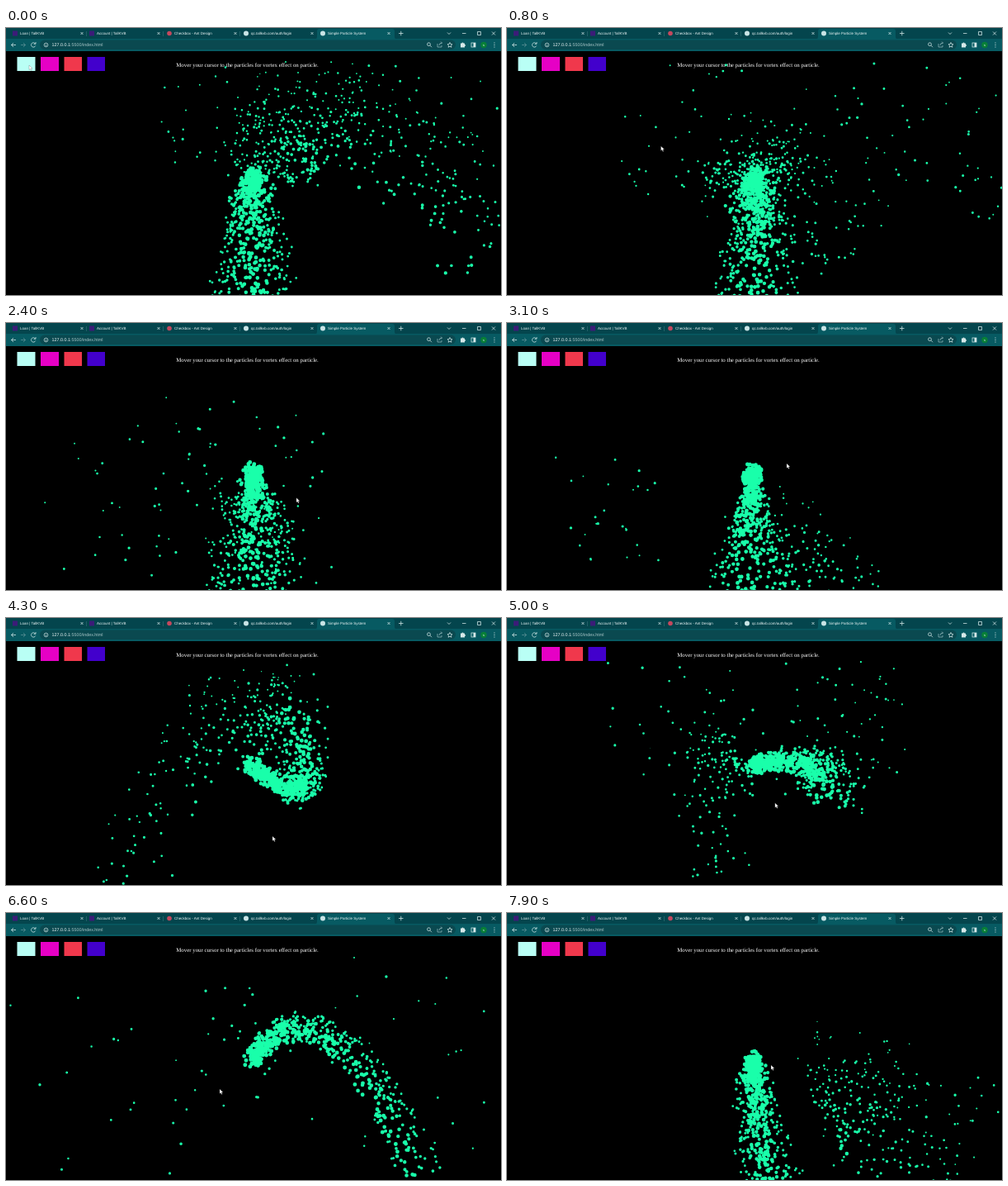
Recreate the animation shown at these times as an HTML page with a canvas. Size 600 px wide and 323 px high, loop 8 s.

```html
<!DOCTYPE html>
<html lang="en">
<head>
<meta charset="utf-8">
<title>Simple Particle System</title>
<style>
  html, body { margin: 0; width: 100%; height: 100%; overflow: hidden; background: #000; }
  canvas, svg { position: absolute; left: 0; top: 0; width: 600px; height: 323px; }
  text { text-rendering: geometricPrecision; }
  .ui { font: 4.5px "Liberation Sans", Arial, sans-serif; fill: #f0f8f8; }
  .line { fill: none; stroke: #d5e8e8; stroke-width: .75; }
</style>
</head>
<body>
<canvas id="stage" width="600" height="323"></canvas>
<svg viewBox="0 0 600 323">
  <rect width="600" height="14" fill="#04454d"/>
  <rect y="13" width="600" height="15" fill="#075a62"/>
  <path d="M374 13.5q3 0 3-3V4q0-3 3-3h88q3 0 3 3v6.500q0 3 3 3z" fill="#075a62"/>
  <rect x="41" y="14.500" width="504" height="11.500" rx="5.700" fill="#0a4950"/>
  <g class="ui">
    <rect x="8" y="3.500" width="6" height="6" fill="#3c1c78"/>
    <rect x="101" y="3.500" width="6" height="6" fill="#3c1c78"/>
    <circle cx="198" cy="6.500" r="2.800" fill="#c4485e"/>
    <circle cx="291" cy="6.500" r="3" fill="#c9e4e6"/>
    <circle cx="384" cy="6.500" r="3" fill="#c9e4e6"/>
    <text x="17" y="8.200">Loan | TallKVB</text>
    <text x="110" y="8.200">Account | TallKVB</text>
    <text x="204" y="8.200">Checkbox - Ant Design</text>
    <text x="297" y="8.200">qc.tallkvb.com/auth/login</text>
    <text x="390" y="8.200">Simple Particle System</text>
    <text x="55.500" y="22.300" style="font-size:5.4px">127.0.0.1<tspan fill="#a9c6c8">:5500/index.html</tspan></text>
  </g>
  <g class="line">
    <path id="closers"/>
    <path d="M97.500 4v6M190.500 4v6M283.500 4v6" stroke="#2b6a70"/>
    <path d="M476 6.500h5.500M478.750 3.750v5.500M535 5.500l2 2 2-2M553 6.500h4.500M571.500 4.500h4v4h-4zM589 4.500l4 4m0-4l-4 4"/>
    <path d="M12 20.500H6.500m2.500-2.500l-2.500 2.500 2.500 2.500"/>
    <path d="M18 20.500h5.500m-2.500-2.500l2.500 2.500-2.500 2.500" stroke="#5f9297"/>
    <path d="M35.500 19a2.700 2.700 0 1 0 .2 2.500M36 17v2.300h-2.300"/>
    <circle cx="48.500" cy="20.500" r="2.300"/><path d="M48.500 20v1.700"/>
    <circle cx="512.500" cy="19.700" r="1.900"/><path d="M514 21.200l2 2"/>
    <path d="M523 19v4h5v-2M525 21q0-3 3.500-3m-1.500-1.500l1.500 1.500-1.500 1.500" stroke="#8fb5b8"/>
    <path d="M538 17.500l.9 2 2.100.2-1.600 1.500.5 2.100-1.900-1.100-1.900 1.100.5-2.100-1.600-1.500 2.100-.2z"/>
    <rect x="564" y="18" width="5" height="5"/>
  </g>
  <path d="M551 18.500h1.500a1 1 0 0 1 2 0h1.500v1.500a1 1 0 0 1 0 2v1.500h-5z" fill="#d5e8e8"/>
  <path d="M566.500 18h2.500v5h-2.500z" fill="#d5e8e8"/>
  <circle cx="579" cy="20.500" r="3.700" fill="#087f37"/>
  <text class="ui" x="579" y="22" text-anchor="middle" style="font-size:4px">s</text>
  <path d="M591.500 17.500h1v1h-1zm0 2.500h1v1h-1zm0 2.500h1v1h-1z" fill="#d5e8e8"/>
  <g>
    <rect x="13.500" y="35" width="22" height="17" fill="#b9fff5"/>
    <rect x="42" y="35" width="22" height="17" fill="#e600c5"/>
    <rect x="70.500" y="35" width="21.500" height="17" fill="#f0384c"/>
    <rect x="98.500" y="35" width="21.500" height="17" fill="#4200cc"/>
  </g>
  <text x="292.500" y="46.500" text-anchor="middle" fill="#fff"
    style="font:6.880px 'Liberation Serif','Times New Roman',serif">Mover your cursor to the particles for vortex effect on particle.</text>
  <path id="cursor" d="M0 0v5.600l1.300-1.200 1 2.100 1-.5-1-2 1.800-.1z" fill="#fff" stroke="#333" stroke-width=".25"/>
</svg>
<script>
const ctx = document.getElementById('stage').getContext('2d');
const cursor = document.getElementById('cursor');
document.getElementById('closers').setAttribute('d',
  [92, 185, 278, 371, 464].map(x => `M${x - 1.5} 5l3 3m0-3l-3 3`).join(''));

const LOOP = 8000, STEP = 100, EMITTER = [299, 178], STREAM = 570;

// jet: control x,y, end x,y, spread on either side, spread exponent
// cloud: start, control, end, spread, count; dust: x0,y0,x1,y1,count
const keys = [
  { t: 0, mouse: [28, 45], jet: [300, 250, 300, 345, 52, 52, .5],
    cloud: [303, 175, 345, 5, 610, 250, 66, 480], dust: [170, 32, 600, 200, 90] },
  { t: 1700, mouse: [365, 253], jet: [320, 230, 300, 345, 50, 62, .7],
    cloud: [285, 195, 190, 195, 175, 345, 75, 200], dust: [60, 40, 600, 315, 160] },
  { t: 3100, mouse: [339, 170], jet: [285, 240, 283, 345, 115, 50, 1.4],
    cloud: [310, 240, 390, 260, 430, 330, 45, 90], dust: [30, 130, 190, 323, 26] },
  { t: 4300, mouse: [323, 264], jet: [400, 270, 345, 105, 42, 36, 1],
    cloud: [330, 115, 230, 85, 140, 325, 50, 190], dust: [215, 50, 385, 130, 40] },
  { t: 5800, mouse: [327, 178], jet: [385, 46, 415, 340, 75, 14, 1.4],
    cloud: [205, 195, 230, 270, 390, 290, 40, 70], dust: [0, 40, 600, 323, 180] },
  { t: 6600, mouse: [259, 213], jet: [390, 70, 498, 340, 42, 7, .5],
    cloud: [285, 95, 270, 170, 180, 310, 25, 14], dust: [0, 45, 590, 320, 50] },
  { t: 7900, mouse: [320, 184], jet: [298, 240, 322, 345, 36, 36, .6],
    cloud: [375, 215, 470, 180, 505, 340, 72, 210], dust: [340, 185, 600, 320, 50] }
];

const rand = (i, k) => {
  const s = Math.sin(i * 127.1 + k * 311.7) * 43758.5453;
  return s - Math.floor(s);
};

function pose(t) {
  let k = 0;
  while (k < keys.length - 2 && keys[k + 1].t <= t) k++;
  const a = keys[k], b = keys[k + 1];
  const f = Math.min(1, (t - a.t) / (b.t - a.t));
  const mix = name => a[name].map((v, i) => v + (b[name][i] - v) * f);
  return { mouse: mix('mouse'), jet: mix('jet'), cloud: mix('cloud'), dust: mix('dust') };
}

// Point on a quadratic curve, pushed sideways by off
function along([x0, y0, x1, y1, x2, y2], u, off) {
  const v = 1 - u;
  const dx = v * (x1 - x0) + u * (x2 - x1), dy = v * (y1 - y0) + u * (y2 - y1);
  const len = Math.hypot(dx, dy) || 1;
  return [
    v * v * x0 + 2 * u * v * x1 + u * u * x2 + off * dy / len,
    v * v * y0 + 2 * u * v * y1 + u * u * y2 - off * dx / len
  ];
}

// Random shift inside a soft disc
function blur([x, y], seed, size) {
  const a = rand(seed, 5) * 2 * Math.PI, d = rand(seed, 6) * size;
  return [x + d * Math.cos(a), y + d * Math.sin(a)];
}

// Age 0..1 within the current life and a seed that changes with each life
function life(i, t, span) {
  const n = t / span + rand(i, 1), cycle = Math.floor(n);
  return [n - cycle, i + cycle * 0.377];
}

function dot([x, y], r) {
  if (r <= 0) return;
  ctx.moveTo(x + r, y);
  ctx.arc(x, y, r, 0, 7);
}

function draw(t) {
  const { mouse, jet, cloud, dust } = pose(t);
  ctx.clearRect(0, 0, 600, 323);
  ctx.fillStyle = '#19ffaa';
  ctx.beginPath();

  const curve = [...EMITTER, ...jet.slice(0, 4)];
  const [right, left, q] = jet.slice(4);
  for (let i = 0; i < STREAM; i++) {
    const [age, s] = life(i, t, 2000);
    const u = age ** 1.5, m = rand(s, 2) ** 1.15;
    const side = rand(s, 3) * (right + left) < right ? right : -left;
    const p = along(curve, u, side * m * u ** q);
    dot(blur(p, s, 12), 2.45 - 1.1 * m * Math.min(1, u * 3));
  }

  const spread = cloud[6], total = cloud[7];
  for (let i = 0; i < total; i++) {
    const [age, s] = life(i + 1000, t, 2400);
    const u = age ** 1.5, m = 1.2 * (rand(s, 2) + rand(s, 3) - 1);
    const p = along(cloud, u, m * spread);
    // lower particles are larger
    const drop = (p[1] - along(cloud, u, 0)[1]) / spread;
    dot(blur(p, s, 14), (1.2 + .6 * drop + .5 * rand(s, 4)) * Math.min(1, total - i));
  }

  const [x0, y0, x1, y1, count] = dust;
  for (let i = 0; i < count; i++) {
    const [age, s] = life(i + 2000, t, 1800);
    const x = x0 + (x1 - x0) * rand(s, 2) ** .7;
    const y = y0 + (y1 - y0) * (rand(s, 3) * .8 + age * .2);
    dot([x, y], (.9 + .8 * rand(s, 4)) * Math.min(1, count - i));
  }

  ctx.fill();
  cursor.setAttribute('transform', `translate(${mouse})`);
}

const start = performance.now();
function tick() {
  const t = (performance.now() - start) % LOOP;
  draw(Math.floor(t / STEP) * STEP);
  requestAnimationFrame(tick);
}
tick();
</script>
</body>
</html>
```
